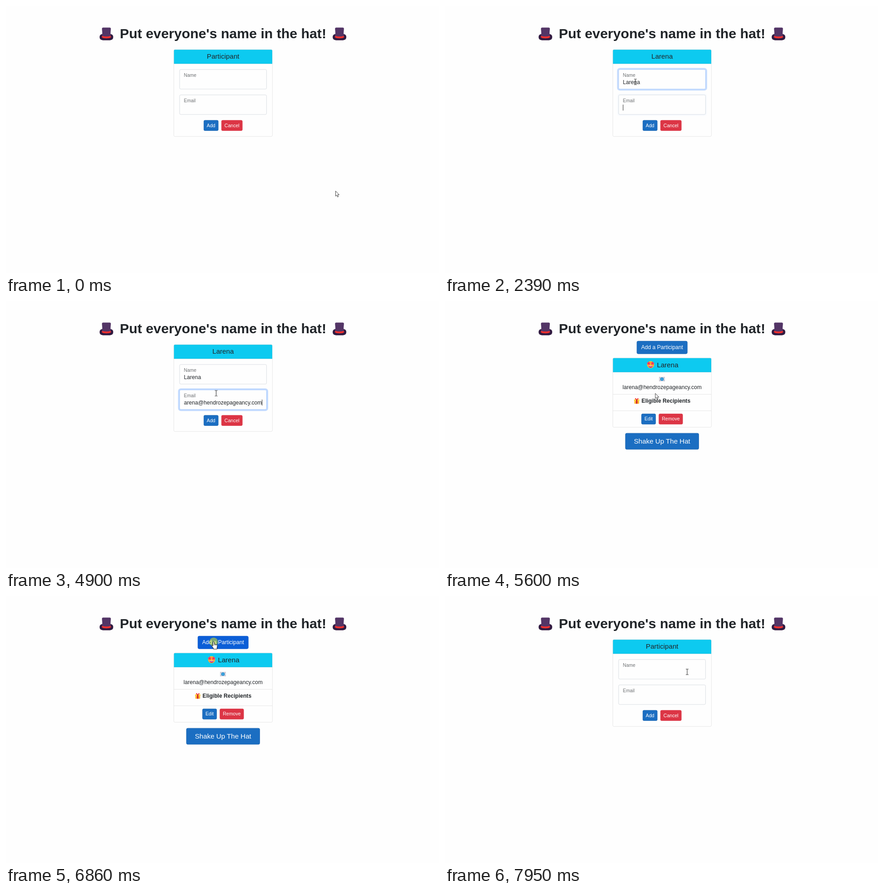
Write an HTML page that moves like this. It is 953 px wide and 588 px high and loops after 8 s.

```html
<!DOCTYPE html>
<html lang="en">
<head>
<meta charset="utf-8">
<title>Names in the hat</title>
<style>
html, body { margin: 0; width: 100%; height: 100%; overflow: hidden; background: #fefefe; }
svg { display: block; width: 100%; height: 100%; }
text { font-family: "Liberation Sans", Arial, sans-serif; fill: #212529; white-space: pre; }
</style>
</head>
<body>
<svg id="stage" viewBox="0 0 953 588">
  <defs>
    <g id="hat">
      <path d="M-15 7.5C-15 3-12 1-9 1H9C12 1 15 3 15 7.5C15 12.5 11 14.5 6 14.5H-6C-11 14.5-15 12.5-15 7.5Z" fill="#321b41"/>
      <path d="M-9.2 3.5L-10 8C-6 11 6 11 10 8L9.2 3.5Z" fill="#f8312f"/>
      <path d="M-9.8-10.5Q-10-13.5-7-13.5H7Q10-13.5 9.8-10.5Q8.6-2 9.5 5Q0 7.5-9.5 5Q-8.6-2-9.8-10.5Z" fill="#533566"/>
    </g>
    <path id="star" d="M0-4.6L1.3-1.6L4.5-1.3L2.1.8L2.8 3.9L0 2.3L-2.8 3.9L-2.1.8L-4.5-1.3L-1.3-1.6Z" fill="#f92f60"/>
    <clipPath id="mailClip"><rect x="517.75" y="270" width="228" height="40"/></clipPath>
  </defs>
  <rect width="953" height="588" fill="#fefefe"/>
  <g id="page" transform="scale(.7563)"></g>
  <use href="#hat" x="221" y="61"/>
  <use href="#hat" x="734" y="61"/>
  <g id="icons">
    <g transform="translate(452.5 140.3)">
      <circle r="7.8" fill="#ffb62e"/>
      <path d="M-4.6 1.8Q0 3 4.6 1.8Q4.4 6.4 0 6.4T-4.6 1.8Z" fill="#bb1d80"/>
      <path d="M-4 1.9Q0 3 4 1.9L3.7 3.3Q0 4-3.7 3.3Z" fill="#fff"/>
      <use href="#star" x="-4.2" y="-3"/><use href="#star" x="4.2" y="-3"/>
    </g>
    <g transform="translate(477.5 172)">
      <rect x="-6.5" y="-5" width="13" height="10" rx="1" fill="#d3d3de"/>
      <path d="M-6-4.6L0 1L6-4.6M-6 4.6L-1.5 0M6 4.6L1.5 0" fill="none" stroke="#b4acbc" stroke-width=".7"/>
      <circle r="3.6" fill="#0084ce"/>
      <circle r="1.5" fill="none" stroke="#cfeaff" stroke-width=".8"/>
    </g>
    <g transform="translate(422 220.2)">
      <rect x="-5.2" y="-1" width="10.4" height="7" rx=".6" fill="#fcb32f"/>
      <rect x="-6" y="-3.4" width="12" height="3.2" rx=".6" fill="#fcd53f"/>
      <rect x="-1.3" y="-3.4" width="2.6" height="9.4" fill="#ca0b2a"/>
      <path d="M0-3.2C-5-3-4.5-6.6-2.6-6.2Q-.8-5.6 0-3.2Q.8-5.6 2.6-6.2C4.5-6.6 5-3 0-3.2Z" fill="#f8312f"/>
    </g>
  </g>
  <circle id="click" r="9.5" fill="#ff0" opacity=".45"/>
  <g id="arrow">
    <path d="M.4.5V11.8L2.9 9.4L4.7 13.6L6.6 12.8L4.9 8.7H8.3Z" fill="#fff" stroke="#111" stroke-width=".8"/>
  </g>
  <g id="beam">
    <path d="M-2.8-6H-.7L0-5.4L.7-6H2.8M0-5.4V5.6M-2.8 6.2H-.7L0 5.6L.7 6.2H2.8" fill="none" stroke="#222" stroke-width="1"/>
  </g>
  <g id="hand">
    <path d="M-1.5.6Q0-1.2 1.3.6V5L3 5.2L5.2 5.7L7.4 6.6Q8.3 7 8.2 8.6L7.4 13V16H-.6V14L-4 9.2Q-4.6 7.6-3 7.6L-1.5 9Z" fill="#fff" stroke="#111" stroke-width=".9" stroke-linejoin="round"/>
    <path d="M1.3 5V8M3.6 5.5V8.2M5.8 6V8.4" stroke="#111" stroke-width=".6"/>
  </g>
</svg>
<script>
const LOOP = 8000;
// page layout in CSS pixels
const MID = 631.75, CARD_W = 288, CARD_X = MID - CARD_W / 2;
const FIELD_X = CARD_X + 17, FIELD_W = CARD_W - 34;
const LEFT = FIELD_X + 13, RIGHT = FIELD_X + FIELD_W - 13;
const FORM_Y = 126.4, RESULT_Y = 165.2;

const NAME = "Larena", USER = "larena", MAIL = USER + "@hendrozepageancy.com";
const NAME_KEYS = [1230, 1380, 1540, 1930, 2080, 2150];
const USER_KEYS = [2550, 2780, 2860, 3250, 3410, 3490];
const RESULT_AT = 5600, FORM_AT = 7020, BLUE = [27, 110, 194], HOVER = [11, 94, 215];
// pointer legs: start, steps, end x, end y
const LEGS = [
  [70, 5, 419, 167], [4580, 1, 462.5, 203], [5750, 6, 474, 324], [6218, 5, 459, 120],
  [6620, 2, 457, 101], [7020, 4, 469, 141], [7870, 2, 533, 167]
];
const $ = id => document.getElementById(id);

function add(parent, tag, attrs, content) {
  const el = document.createElementNS("http://www.w3.org/2000/svg", tag);
  for (const k in attrs) el.setAttribute(k, attrs[k]);
  if (content) el.textContent = content;
  parent.appendChild(el);
  return el;
}
const group = parent => add(parent, "g", {});
const rect = (p, x, y, width, height, attrs) => add(p, "rect", { x, y, width, height, ...attrs });
const label = (p, s, x, y, size, attrs) => add(p, "text", { x, y, "font-size": size, ...attrs }, s);
const centered = (p, s, x, y, size, attrs) => label(p, s, x, y, size, { "text-anchor": "middle", ...attrs });
const show = (el, on) => el.setAttribute("display", on ? "inline" : "none");
const rgb = c => `rgb(${c.map(Math.round)})`;
const mix = (a, b, k) => a + (b - a) * k;
const smooth = k => { k = Math.min(1, Math.max(0, k)); return k * k * (3 - 2 * k); };
const fade = (t, start) => smooth((t - start) / 150);

const rule = (p, y) => rect(p, CARD_X + 1, y, CARD_W - 2, 1, { opacity: .125 });

function card(p, y, height) {
  const x = CARD_X + 1, r = CARD_X + CARD_W - 1, top = y + 1;
  add(p, "path", { d: `M${x} ${y + 42}V${top + 3}Q${x} ${top} ${x + 3} ${top}H${r - 3}Q${r} ${top} ${r} ${top + 3}V${y + 42}Z`, fill: "#0dcaf0" });
  rect(p, CARD_X + .5, y + .5, CARD_W - 1, height - 1, { rx: 3.5, fill: "none", stroke: "#000", "stroke-opacity": .125 });
  rule(p, y + 41);
}

function button(p, s, x, y, width, height, size, base, danger) {
  const colors = danger ? { fill: "#dc3545", stroke: "#dc3545" } : { fill: "#1b6ec2", stroke: "#1861ac" };
  const box = rect(p, x + .5, y + .5, width - 1, height - 1, { rx: size > 14 ? 4 : 3, ...colors });
  centered(p, s, x + width / 2, y + base, size, { style: "fill:#fff" });
  return box;
}

// two small buttons side by side, centred in the card
function buttonPair(p, y, first, w1, second, w2) {
  const gap = 8.5, x = MID - (w1 + gap + w2) / 2;
  button(p, first, x, y, w1, 31, 14, 20.1);
  button(p, second, x + w1 + gap, y, w2, 31, 14, 20.1, true);
}

function wideButton(p, s, y, width, height, size, base) {
  return button(p, s, MID - width / 2, y, width, height, size, base);
}

function field(p, s, y) {
  const ring = rect(p, FIELD_X - 2, y - 2, FIELD_W + 4, 62, { rx: 6, fill: "none", stroke: "#0d6efd", "stroke-opacity": .25, "stroke-width": 4 });
  const box = rect(p, FIELD_X + .5, y + .5, FIELD_W - 1, 57, { rx: 3.5, fill: "#fefefe" });
  label(p, s, LEFT, y + 22.3, 13.6, { opacity: .65 });
  const value = label(p, "", LEFT, y + 42.7, 16);
  const caret = rect(p, LEFT, y + 28.7, 1.1, 17.3, { fill: "#000" });
  return { ring, box, value, caret };
}

const page = $("page");
centered(page, "Put everyone's name in the hat!", MID, 94.4, 40, { "font-weight": 700 });

const form = group(page);
card(form, FORM_Y, 254);
const heading = centered(form, "", MID, FORM_Y + 27.6, 20);
const nameField = field(form, "Name", FORM_Y + 58);
const mailField = field(form, "Email", FORM_Y + 132);
mailField.value.setAttribute("clip-path", "url(#mailClip)");
buttonPair(form, FORM_Y + 206, "Add", 42.9, "Cancel", 61.6);

const result = group(page);
const addButton = wideButton(result, "Add a Participant", 116.3, 147.8, 38, 16, 24.3);
card(result, RESULT_Y, 203);
label(result, NAME, 616.8, RESULT_Y + 27.6, 20);
centered(result, MAIL, MID, RESULT_Y + 90.8, 16);
rule(result, RESULT_Y + 106);
label(result, "Eligible Recipients", 572, RESULT_Y + 131.6, 16, { "font-weight": 700 });
rule(result, RESULT_Y + 154);
buttonPair(result, RESULT_Y + 163, "Edit", 42.1, "Remove", 70.1);
const shakeButton = wideButton(result, "Shake Up The Hat", 384.5, 214.5, 48, 20, 30.6);

function setField(f, text, focus, caretOn) {
  f.ring.setAttribute("opacity", focus);
  f.box.setAttribute("stroke", rgb([mix(206, 134, focus), mix(212, 183, focus), mix(218, 254, focus)]));
  f.value.textContent = text;
  const width = text ? f.value.getComputedTextLength() : 0;
  const x = Math.min(LEFT, RIGHT - 1 - width);
  f.value.setAttribute("x", x);
  f.caret.setAttribute("x", x + width);
  show(f.caret, caretOn);
}

function setHover(box, k) {
  box.setAttribute("fill", rgb(BLUE.map((c, i) => mix(c, HOVER[i], k))));
  box.setAttribute("stroke", k > .5 ? "#0a58ca" : "#1861ac");
}

function pointer(t) {
  let x = 725, y = 407;
  for (const [start, steps, endX, endY] of LEGS) {
    if (t < start) break;
    const k = smooth((Math.floor((t - start) / 78) + 1) / steps);
    x = mix(x, endX, k);
    y = mix(y, endY, k);
  }
  return [x, y];
}

const within = (x, y, x0, y0, x1, y1) => x >= x0 && x <= x1 && y >= y0 && y <= y1;
function pointerKind(x, y, onResult) {
  if (onResult) {
    const overButton = within(x, y, 421, 88, 534, 117) || within(x, y, 397, 291, 559, 327);
    return overButton ? "hand" : "arrow";
  }
  const overField = within(x, y, 381, 139, 574, 183) || within(x, y, 381, 195, 574, 240);
  return overField ? "beam" : "arrow";
}

const typed = (s, keys, t) => s.slice(0, keys.filter(k => t >= k).length);

function draw(t) {
  const onResult = t >= RESULT_AT && t < FORM_AT, fresh = t >= FORM_AT;
  show(form, !onResult);
  show(result, onResult);
  show($("icons"), onResult);

  if (onResult) {
    setHover(shakeButton, fade(t, 5960) - fade(t, 6296));
    setHover(addButton, fade(t, 6600));
  } else {
    heading.textContent = t >= 2390 && !fresh ? NAME : "Participant";
    const nameCaret = t >= 460 && t < 2390 && !(t >= 1000 && t < 1230);
    const mailCaret = t >= 2390 && !fresh && !(t >= 4350 && t < 4900);
    const mail = t >= 3800 ? MAIL : typed(USER, USER_KEYS, t);
    setField(nameField, fresh ? "" : typed(NAME, NAME_KEYS, t), fresh ? 0 : fade(t, 440) - fade(t, 2365), nameCaret);
    setField(mailField, fresh ? "" : mail, fresh ? 0 : fade(t, 2365), mailCaret);
  }

  const [x, y] = pointer(t), kind = pointerKind(x, y, onResult);
  for (const id of ["arrow", "beam", "hand"]) show($(id), id === kind);
  $(kind).setAttribute("transform", `translate(${x} ${y})`);
  const click = $("click");
  show(click, (t >= 460 && t < 610) || (t >= 6860 && t < FORM_AT));
  click.setAttribute("cx", x);
  click.setAttribute("cy", y);
}

const began = performance.now();
function tick() {
  draw((performance.now() - began) % LOOP);
  requestAnimationFrame(tick);
}
tick();
</script>
</body>
</html>
```
